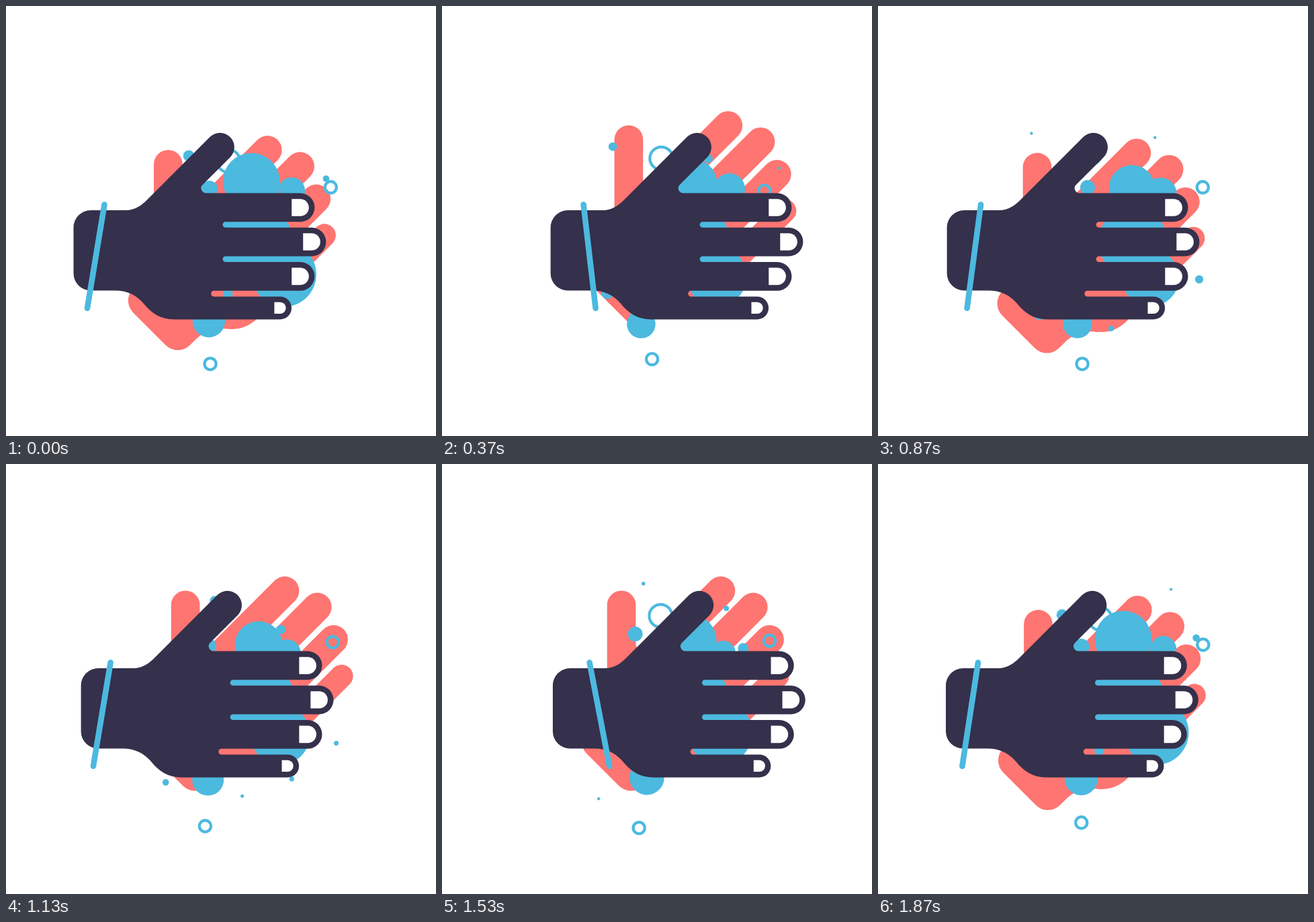
An HTML page with a canvas for the animation above (1930 ms loop, 640x640 px).

```html
<!DOCTYPE html>
<html lang="en">
<head>
<meta charset="utf-8">
<title>Washing hands</title>
<style>
html, body { margin: 0; height: 100%; overflow: hidden; background: #fff; }
canvas { display: block; width: 100vw; height: 100vh; }
</style>
</head>
<body>
<canvas id="stage" width="640" height="640"></canvas>
<script>
const ctx = document.getElementById('stage').getContext('2d');
const DARK = '#35304b', CORAL = '#ff7571', BLUE = '#4cb9df';
const LOOP = 1930, STEPS = 48, CYCLE = 24;

const finger = 'a21.35 21.35 0 0 1 0 42.7';
const gap = 'a4.3 4.3 0 0 0 0 8.6';

// Outline of a hand whose wrist starts at x = w
const handPath = w => new Path2D(`M${w + 25.6} 304H178C192 304 202 296.5 210 288.5
  L303.4 195.1A21.35 21.35 0 0 1 333.6 225.3L292.8 266A7.3 7.3 0 0 0 298 278.5
  H438${finger}H326.8${gap}H455${finger}H326.8${gap}H438${finger}H309.5${gap}
  H408a17 17 0 0 1 0 34H250C230 466.4 216 457 205 443C195 431 181 423.5 162 423.5
  H${w + 25.6}a25.6 25.6 0 0 1 -25.6 -25.6V329.6a25.6 25.6 0 0 1 25.6 -25.6z`);
const frontHand = handPath(100.5), backHand = handPath(125.5);

// Eased progress along cubic-bezier(x1, 0, x2, 1)
function ease(x1, x2, x) {
  let lo = 0, hi = 1;
  for (let i = 0; i < 25; i++) {
    const m = (lo + hi) / 2, k = 1 - m;
    if (3 * m * k * (k * x1 + m * x2) + m * m * m < x) lo = m; else hi = m;
  }
  return lo * lo * (3 - 2 * lo);
}

// Closed Catmull-Rom curve through evenly spaced values, u in 0..1
function curve(v, u) {
  const n = v.length, i = Math.floor(u * n), f = u * n - i;
  const [a, b, c, d] = [-1, 0, 1, 2].map(k => v[(i + k + n) % n]);
  return b + f / 2 * (c - a + f * (2 * a - 5 * b + 4 * c - d + f * (3 * (b - c) + d - a)));
}

const wave = (n, peak) => Math.cos((n - peak) / STEPS * 2 * Math.PI);

function circle(x, y, r, ring) {
  ctx.beginPath();
  ctx.arc(x, y, r, 0, 2 * Math.PI);
  if (ring) ctx.stroke(); else ctx.fill();
}

function foam(n) {
  const sway = (peak, x, dx, y, dy, r, dr = 0, ring = false, rPeak = peak) => {
    const w = wave(n, peak);
    circle(x + dx * w, y + dy * w, r + dr * wave(n, rPeak), ring);
  };
  // A bubble that flies straight, shrinks and bursts at (x, y)
  const drift = (end, life, x, y, vx, vy, size) => {
    for (const left of [end - n, end - n - STEPS]) {
      if (left <= 0 || left > life) continue;
      circle(x - vx * left, y - vy * left, Math.min(size, 2.1 + .019 * left * left));
    }
  };
  // A bubble that slides between two steps at constant size
  const slide = (from, to, x, y, vx, vy, r) => {
    const age = (n - from + STEPS) % STEPS;
    if (age < to - from) circle(x + vx * age, y + vy * age, r);
  };

  ctx.fillStyle = ctx.strokeStyle = BLUE;
  ctx.lineWidth = 4.2;
  sway(46, 371.5, -6.5, 266, -5, 38.4, 4.1);
  sway(45, 373.5, -6, 350.5, -.5, 55, 3.5);
  sway(43, 410, 4.8, 402, -3, 45.5, 3.2);
  sway(8, 422.5, 5.5, 277.5, -5.5, 21.3, 3, false, 16);
  sway(39, 300, 5, 470.5, -4, 23.2, 2.7);
  sway(0, 323.5, 7.5, 224.5, 6, 17, 0, true);
  sway(35, 483.8, 4, 269, -6.3, 8.6, 0, true);
  sway(11, 302.7, 10.3, 533.8, -8.5, 8.6, 0, true);

  slide(20, 34, 315.3, 269.7, -1.67, .17, 11);
  slide(34, 42, 292, 272, -1.1, -4.75, 11);
  slide(44, 52, 302, 272, .2, 0, 12);
  drift(72, 30, 224.5, 186.5, -1.98, -1.52, 8.3);
  drift(92, 40, 293.5, 163, -1.05, -2.52, 8);
  drift(60, 28, 510, 236, 2.8, -1.75, 8);
  drift(24.5, 24, 415.3, 189.6, 1.23, -2.42, 7);
  drift(47.9, 20, 437.3, 183.7, 1.42, -3.15, 7);
  drift(36.6, 20, 510.9, 427.7, 2.25, 1.42, 7);
  drift(80.8, 38, 355.3, 505.5, .77, 2.36, 7.5);
  drift(37, 18, 436, 489, 1.2, 2.25, 6);
  drift(40, 36, 232.3, 503.2, -.45, 2.45, 8.8);
}

function nail(x, y, r) {
  ctx.beginPath();
  ctx.arc(x, y, r, -Math.PI / 2, Math.PI / 2);
  ctx.lineTo(x - r, y + r);
  ctx.lineTo(x - r, y - r);
  ctx.fill();
}

function draw(n) {
  const p = n % CYCLE, q = (p + 15) % CYCLE;
  const shift = 66.5 * (p < 12 ? ease(.6, .4, p / 12) : 1 - ease(.6, .4, p / 12 - 1));
  const lift = 41.4 * (q < 12 ? 1 - ease(.6, .5, q / 12) : ease(.5, .4, q / 12 - 1));

  ctx.setTransform(1, 0, 0, 1, 0, 0);
  ctx.fillStyle = '#fff';
  ctx.fillRect(0, 0, 640, 640);

  const h = Math.SQRT1_2;
  ctx.setTransform(h, -h, h, h, lift - 137.3, 316.9 - lift);
  ctx.fillStyle = CORAL;
  ctx.fill(backHand);

  ctx.setTransform(1, 0, 0, 1, 0, 0);
  foam(n);

  ctx.translate(shift, 0);
  ctx.fillStyle = DARK;
  ctx.fill(frontHand);
  ctx.fillStyle = '#fff';
  nail(438, 300, 12.8);
  nail(455, 351, 12.8);
  nail(438, 402.4, 12.8);
  nail(408, 449.3, 8.6);

  // Wristband, its lower end swinging behind the motion
  const u = p / CYCLE;
  ctx.lineWidth = 8.6;
  ctx.lineCap = 'round';
  ctx.beginPath();
  ctx.moveTo(100.5 + curve([46, 44, 45, 49, 53.5, 55, 55, 52.5], u), 295.5);
  ctx.lineTo(100.5 + curve([20.5, 18, 25, 67, 82, 84, 78.5, 38], u), 449.8);
  ctx.stroke();
}

// Steps follow a repeating 200 ms rhythm of five
const BEATS = [0, 30, 70, 130, 170];
function stepAt(ms) {
  const t = ms % LOOP;
  return 5 * Math.floor(t / 200) + BEATS.filter(b => b <= t % 200).length - 1;
}

const start = performance.now();
function tick() {
  draw(stepAt(performance.now() - start));
  requestAnimationFrame(tick);
}
tick();
</script>
</body>
</html>
```
